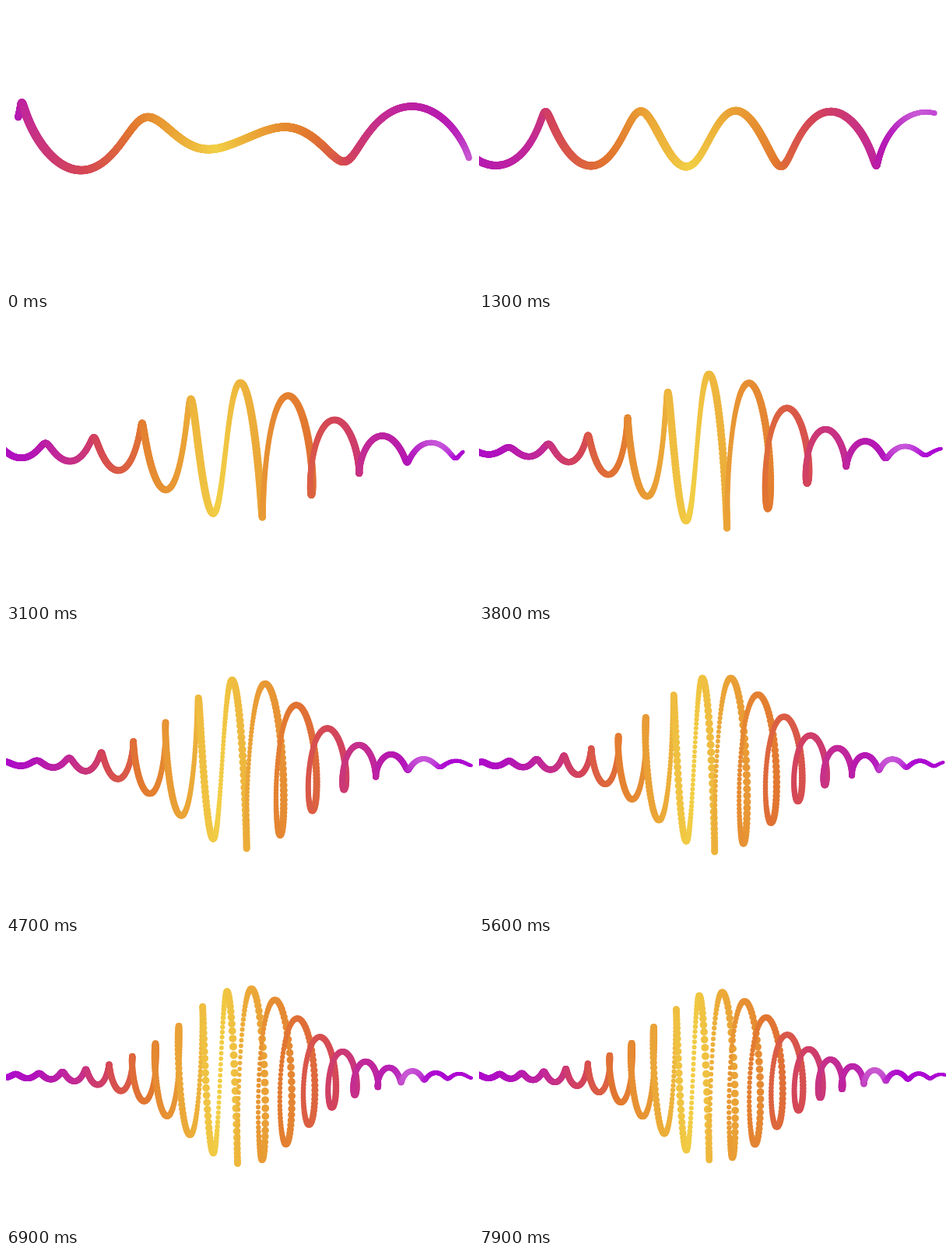
Write an HTML page with a canvas that moves like this. It is 600 px wide and 365 px high and loops after 8000 ms.

```html
<!DOCTYPE html>
<html lang="en">
<head>
<meta charset="utf-8">
<title>Helical wave packet</title>
<style>
  html, body { margin: 0; width: 100%; height: 100%; overflow: hidden; background: #fff; }
  canvas { display: block; }
</style>
</head>
<body>
<canvas id="stage" width="600" height="365"></canvas>
<script>
const ctx = document.getElementById('stage').getContext('2d');

const LOOP = 8000, STEP = 100, HOLD = 700, GROW = 7200;
const DOTS = 1500, START = -3;
const FOCAL = 500, EYE_X = 276;
const ANCHOR = 267.5, PACKET_X = 304, COLOR_X = 273;

// Colours from the centre outwards, one every BAND pixels.
const BAND = 50;
const palette = ['f2cf46', 'eaa236', 'e27830', 'd44658', 'c22a98', 'b214ba', 'ad08d2']
  .map(hex => [0, 2, 4].map(i => parseInt(hex.slice(i, i + 2), 16)));

const lerp = (a, b, u) => a + (b - a) * u;

// The wave's settings at progress s, from long and flat (0) to a tight packet (1).
function shapeAt(s) {
  const rest = 1 - s;
  const base = 0.8 + 48 * Math.max(0, 1 - 2 * s) ** 2;
  const top = 11 + 100 * (1 - Math.abs(1 - s / 0.77) ** 2.5);
  return {
    base,
    peak: top - base,
    wave: 0.0381 + 0.153 * s + 0.1188 * s ** 2 - 0.0885 * s ** 4,
    half: 91 + 41 * rest ** 2.6,
    end: 598 - 28 * rest ** 4,
    radius: 3.9 + 1.3 * rest ** 3,
    spread: 0.93 + 0.22 * rest ** 3,
    pale: 510 + 65 * rest,
    axis: 170.5 + 2 * s
  };
}

// Envelope between a sech and a Gaussian, one half at u = 1.
function bell(u) {
  return (1 / Math.cosh(1.317 * u) + 2 ** (-u * u)) / 2;
}

function color(distance, light) {
  const f = Math.min(distance / BAND, palette.length - 1.001);
  const i = Math.floor(f);
  const rgb = palette[i].map((c, n) =>
    Math.round(lerp(lerp(c, palette[i + 1][n], f - i), 255, light)));
  return `rgb(${rgb})`;
}

function draw(t) {
  const p = shapeAt(Math.max(0, t - HOLD) / GROW);
  ctx.fillStyle = '#fff';
  ctx.fillRect(0, 0, 600, 365);

  for (let i = 0; i <= DOTS; i++) {
    const x = lerp(START, p.end, i / DOTS);
    const amp = p.base + p.peak * bell((x - PACKET_X) / p.half);
    const angle = p.wave * (x - ANCHOR) + Math.PI;
    const depth = amp * Math.sin(angle) / FOCAL;
    const scale = 1 / (1 - depth);
    const taper = 1 - 0.5 * Math.max(0, (x - 450) / 150) ** 2;
    const light = 0.3 * Math.exp(-(((x - p.pale) / 18) ** 2));
    ctx.fillStyle = color(Math.abs(x - COLOR_X) / p.spread, light);
    ctx.beginPath();
    ctx.arc(EYE_X + (x - EYE_X) * scale,
      p.axis - amp * Math.cos(angle) * scale,
      p.radius * taper * (1 + 1.3 * depth), 0, 2 * Math.PI);
    ctx.fill();
  }
}

const began = performance.now();
let shown = -1;

function tick() {
  const t = (performance.now() - began) % LOOP;
  const now = Math.floor(t / STEP) * STEP;
  if (now !== shown) draw(shown = now);
  requestAnimationFrame(tick);
}
tick();
</script>
</body>
</html>
```
